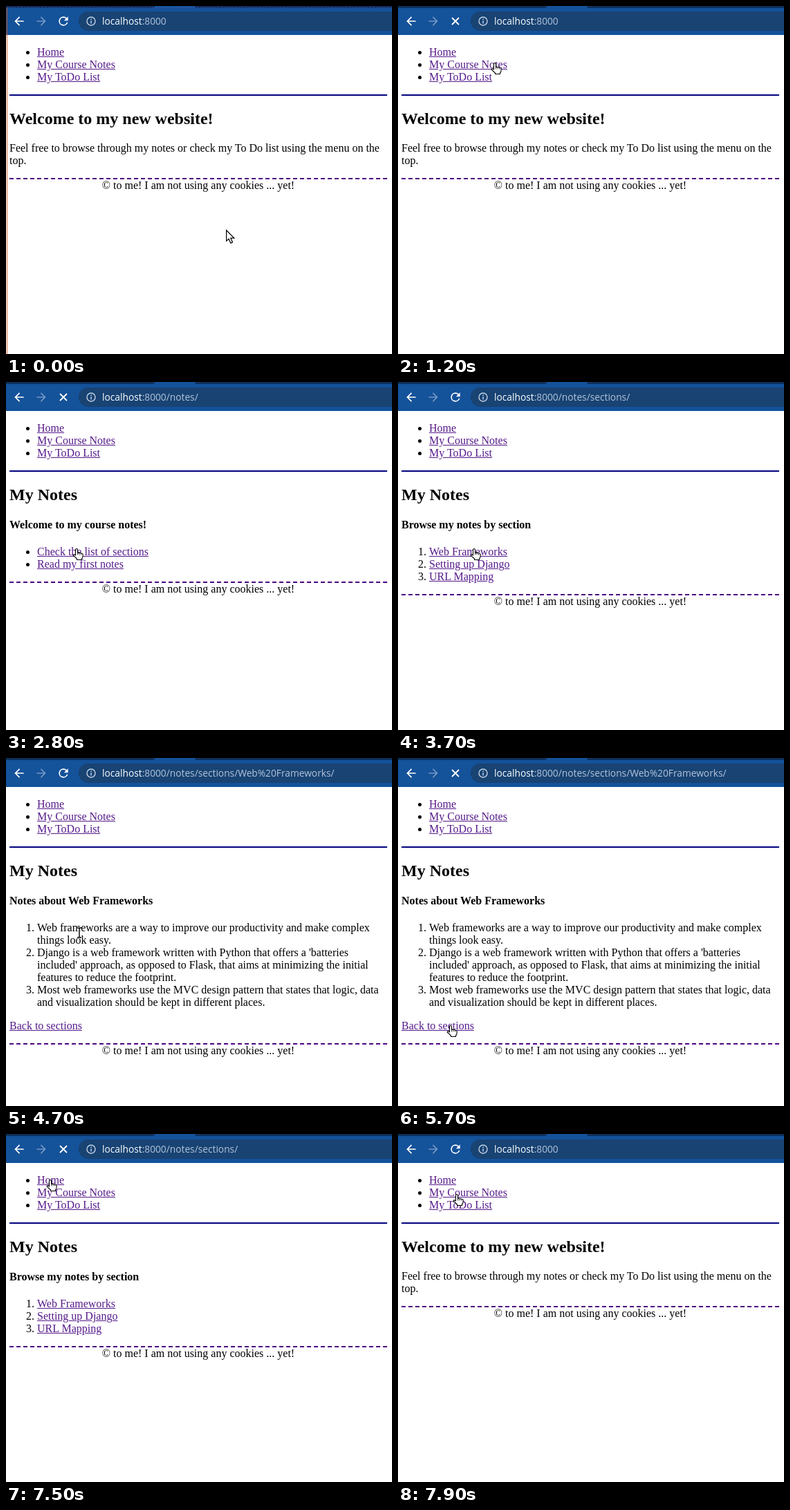
An HTML page that plays this animation: 558 px wide and 504 px high, repeating every 8000 ms.

```html
<!DOCTYPE html>
<html lang="en">
<head>
<meta charset="utf-8">
<title>Course notes</title>
<style>
  html, body { margin: 0; width: 558px; height: 504px; overflow: hidden; background: #fff; }
  body { position: relative; font: 16px/18px "Liberation Serif", serif; color: #000; }
  .bar { position: absolute; inset: 0 0 auto; height: 42px; background: #14529a; overflow: hidden; }
  .strip { position: absolute; top: 0; height: 3px; background: #0e305f; }
  .pill { position: absolute; left: 105px; top: 8px; width: 480px; height: 28px; border-radius: 14px; background: #184373; }
  .url { position: absolute; left: 139px; top: 8px; white-space: pre; color: #b3c5da;
         font: 13.75px/28px "Open Sans", sans-serif; }
  .url b { font-weight: 400; color: #fff; }
  svg { position: absolute; left: 0; top: 0; overflow: visible; }
  .page { position: absolute; left: 5px; top: 42px; width: 546px; display: flow-root; }
  nav { border-bottom: 2px solid #000080; display: flow-root; }
  ul, ol { margin: 16px 0; padding-left: 40px; }
  h2 { font-size: 24px; line-height: 27px; margin: 19.92px 0; }
  h4 { margin: 21.28px 0; }
  p { margin: 16px 0; }
  a { color: #551a8b; text-decoration: underline; }
  footer { border-top: 2px dashed #4b0082; text-align: center; }
  .region { position: absolute; left: 1px; top: 2px; width: 556px; height: 510px;
            border-left: 1px solid rgba(200, 84, 30, .85); border-top: 1px dashed rgba(96, 84, 180, .6); }
</style>
</head>
<body>
<div id="pages"></div>
<div class="bar">
  <div class="strip" style="left:0;width:215px;border-radius:0 0 3px 0"></div>
  <div class="strip" style="left:273px;width:285px;border-radius:0 0 0 3px"></div>
  <div class="pill"></div>
  <svg width="558" height="42" fill="#fff">
    <path id="back" transform="translate(9 12) scale(.833)" d="M20 11H7.83l5.59-5.59L12 4l-8 8 8 8 1.41-1.41L7.83 13H20z"/>
    <path transform="translate(61 12) scale(-.833 .833)" fill="#7597c3" d="M20 11H7.83l5.59-5.59L12 4l-8 8 8 8 1.41-1.41L7.83 13H20z"/>
    <path id="reload" transform="translate(73 12) scale(.833)" d="M17.65 6.35A7.96 7.96 0 0 0 12 4a8 8 0 1 0 7.73 10h-2.08A6 6 0 1 1 12 6c1.66 0 3.14.69 4.22 1.78L13 11h7V4z"/>
    <path id="stop" d="M78 17l10 10M88 17l-10 10" stroke="#fff" stroke-width="1.8"/>
    <g fill="#c3d2e4">
      <circle cx="123" cy="22" r="6" fill="none" stroke="#c3d2e4" stroke-width="1.4"/>
      <path d="M122.3 21.2h1.5v4.2h-1.5zM122.3 18.5h1.5v1.5h-1.5z"/>
    </g>
  </svg>
  <div class="url"><b>localhost</b><span id="path"></span></div>
</div>
<div class="region" id="region"></div>
<svg id="cursor" width="20" height="20">
  <path id="arrow" d="M.6.8V16.4L4.1 13.2 6.8 19.4 9.5 18.2 6.8 12.1H11.8z" fill="#fff" stroke="#000" stroke-width="1.2"/>
  <g id="hand" transform="translate(-6 -1)" stroke="#000" stroke-width="1.1">
    <path fill="#fff" stroke-linejoin="round" d="M4.5 10V2a1.5 1.5 0 0 1 3 0v4.5q1.5-1 2.5.3 1.5-.8 2.5.5 2.2-.5 2.6 1.2v3q0 2-1.6 3.5v1.5h-7V15L1.2 10.2q0-1.7 1.8-1.2z"/>
    <path fill="none" stroke-width=".8" d="M7.6 7v2.4M10 7.3v2.1M12.5 7.6v1.8"/>
  </g>
  <g id="beam" fill="none">
    <path d="M-3-7h2l1 1 1-1h2M0-6V6M-3 7h2l1-1 1 1h2" stroke="#fff" stroke-width="3"/>
    <path d="M-3-7h2l1 1 1-1h2M0-6V6M-3 7h2l1-1 1 1h2" stroke="#000" stroke-width="1.4"/>
  </g>
</svg>
<script>
const $ = id => document.getElementById(id);
const link = s => `<a>${s}</a>`;
const list = (tag, items) => `<${tag}>${items.map(s => `<li>${s}</li>`).join('')}</${tag}>`;
const notes = (title, body) => `<h2>My Notes</h2><h4>${title}</h4>${body}`;

const pages = {
  home: [':8000', `<h2>Welcome to my new website!</h2>
    <p>Feel free to browse through my notes or check my To Do list using the menu on the top.</p>`],
  notes: [':8000/notes/', notes('Welcome to my course notes!',
    list('ul', ['Check the list of sections', 'Read my first notes'].map(link)))],
  sections: [':8000/notes/sections/', notes('Browse my notes by section',
    list('ol', ['Web Frameworks', 'Setting up Django', 'URL Mapping'].map(link)))],
  detail: [':8000/notes/sections/Web%20Frameworks/', notes('Notes about Web Frameworks',
    list('ol', [
      'Web frameworks are a way to improve our productivity and make complex things look easy.',
      "Django is a web framework written with Python that offers a 'batteries included' approach, as opposed to Flask, that aims at minimizing the initial features to reduce the footprint.",
      'Most web frameworks use the MVC design pattern that states that logic, data and visualization should be kept in different places.'
    ]) + `<p>${link('Back to sections')}</p>`)]
};

const menu = `<nav>${list('ul', ['Home', 'My Course Notes', 'My ToDo List'].map(link))}</nav>`;
const foot = '<footer>© to me! I am not using any cookies ... yet!</footer>';
$('pages').innerHTML = Object.entries(pages)
  .map(([id, [, body]]) => `<div class="page" id="${id}">${menu}${body}${foot}</div>`).join('');

// time, page, loading
const states = [
  [0, 'home', 0], [1100, 'home', 1], [1300, 'notes', 0],
  [2800, 'notes', 1], [3000, 'sections', 0],
  [4000, 'sections', 1], [4200, 'detail', 1], [4300, 'detail', 0],
  [5700, 'detail', 1], [5900, 'sections', 1], [6000, 'sections', 0],
  [7400, 'sections', 1], [7600, 'home', 0]
];

// time, hotspot x, y, shape from here on
const moves = [
  [0, 318, 324, 'arrow'], [100, 315, 320, 'arrow'], [300, 270, 250, 'arrow'],
  [400, 232, 202, 'beam'], [600, 170, 122, 'arrow'], [700, 152, 100, 'arrow'],
  [800, 143, 87, 'hand'], [900, 140, 83, 'hand'],
  [1600, 140, 83, 'hand'], [1800, 130, 112, 'arrow'], [2000, 112, 167, 'arrow'],
  [2200, 106, 218, 'arrow'], [2400, 103, 240, 'hand'], [2500, 102, 242, 'hand'],
  [3600, 102, 242, 'hand'], [3700, 110, 242, 'hand'], [3800, 106, 252, 'hand'],
  [4300, 106, 252, 'beam'], [4700, 106, 253, 'beam'], [5000, 119, 310, 'beam'],
  [5200, 98, 366, 'arrow'], [5300, 82, 383, 'hand'], [5400, 76, 388, 'hand'],
  [6000, 76, 388, 'arrow'], [6100, 76, 388, 'arrow'], [6400, 98, 372, 'arrow'],
  [6700, 128, 324, 'arrow'], [6800, 137, 252, 'hand'], [6900, 141, 178, 'arrow'], [7000, 138, 129, 'arrow'],
  [7100, 104, 92, 'hand'], [7200, 72, 71, 'hand'], [7300, 64, 67, 'hand'],
  [7600, 64, 67, 'hand'], [7900, 85, 88, 'hand'], [8000, 85, 88, 'hand']
];

const LOOP = 8000, STEP = 100;
const at = (rows, t) => rows.findLastIndex(r => r[0] <= t);
const show = (id, on) => { $(id).style.display = on ? '' : 'none'; };

function draw(t) {
  const [, page, loading] = states[at(states, t)];
  for (const id in pages) show(id, id === page);
  $('path').textContent = pages[page][0];
  show('stop', loading);
  show('reload', !loading);
  show('region', t < STEP);

  const i = at(moves, t);
  const [t0, x0, y0, shape] = moves[i];
  const [t1, x1, y1] = moves[i + 1];
  const k = (t - t0) / (t1 - t0);
  const x = Math.round(x0 + (x1 - x0) * k), y = Math.round(y0 + (y1 - y0) * k);
  $('cursor').style.transform = `translate(${x}px, ${y}px)`;
  for (const id of ['arrow', 'hand', 'beam']) show(id, id === shape);
}

const start = performance.now();
let last = -1;
function tick() {
  const t = Math.floor((performance.now() - start) % LOOP / STEP) * STEP;
  if (t !== last) draw(last = t);
  requestAnimationFrame(tick);
}
tick();
</script>
</body>
</html>
```
